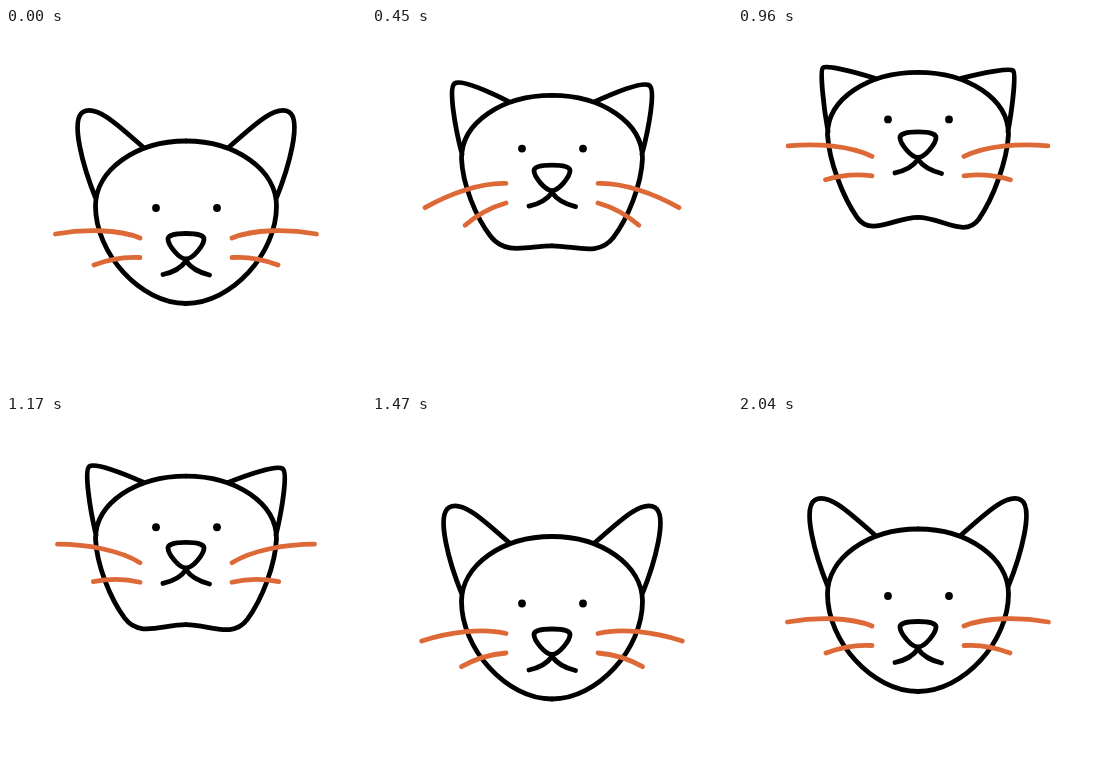
An HTML page for the animation above (2.34 s loop, 360 by 360 pixels).

```html
<!DOCTYPE html>
<html lang="en">
<head>
<meta charset="utf-8">
<title>Jumping cat</title>
<style>
html, body { margin: 0; height: 100%; overflow: hidden; background: #fff; }
svg { display: block; width: 100vw; height: 100vh; }
path { fill: none; stroke: #000; stroke-width: 4.8; stroke-linecap: round; stroke-linejoin: round; }
.whisker { stroke: #dd6937; }
</style>
</head>
<body>
<svg viewBox="0 0 360 360">
  <g id="body">
    <path id="left"/>
    <path id="right" transform="matrix(-1 0 0 1 360 0)"/>
    <circle cx="150" cy="180" r="3.9"/><circle cx="211" cy="180" r="3.9"/>
    <g id="muzzle">
      <path d="M180 205.5Q198 205.5 198 211C198 217 187 231 180 231S162 217 162 211Q162 205.5 180 205.5Z"/>
      <path d="M157 246.5Q173 243 180 233Q187 243 203.5 247"/>
    </g>
    <g id="whiskers">
      <g id="side">
        <path class="whisker" data-y="210" d="M134 210C112 201 78 201 49.5 206"/>
        <path class="whisker" data-y="229.5" d="M134 229.5Q111 228 88 237"/>
      </g>
      <use href="#side" transform="matrix(-1 0 0 1 360 0)"/>
    </g>
  </g>
</svg>
<script>
const LOOP = 2340, STEP = 30, LAST = 2040;
const $ = id => document.getElementById(id);
const whiskers = document.querySelectorAll(".whisker");

const span = (t, a, b) => Math.min(1, Math.max(0, (t - a) / (b - a)));
const ease = (t, a, b) => {
  const u = span(t, a, b);
  return u * u * (3 - 2 * u);
};

// Left half of head and ear; each point drifts by (dx, dy) as the cat lifts.
function half(lift, tilt) {
  const p = (x, y, dx, dy) => `${x + dx * lift} ${y + dy * lift} `;
  const crown = "M" + p(180, 113, 0, 20) + "C" + p(130, 113, 0, 20) + p(89.5, 142, 0, 17.5) + p(89.5, 178, 0, 17);
  const jaw = "C" + p(89.5, 201.5, 1.5, 20.5) + p(100.6, 226, 4.4, 32 + tilt) + p(117.5, 244.4, 1.5, 33.6 + tilt)
    + "S" + p(157, 275.5, -1, 2.5) + p(180, 275.5, 0, 2.5);
  const ear = "M" + p(90, 171, 0, 21) + "C" + p(77, 139, 8, 26) + p(64, 92, 18, 39 + 2 * tilt) + p(77, 84, 8, 44.5 + 2 * tilt)
    + "S" + p(112, 97, 0, 34 + tilt) + p(138, 120, -1, 19);
  return crown + jaw + ear;
}

const shift = (id, y) => $(id).setAttribute("transform", `translate(0 ${y})`);

function draw(t) {
  // Crouch, rise and fall like a thrown ball, then settle.
  const rise = 1 - (1 - span(t, 210, 748)) ** 2;
  const lift = rise - span(t, 925, 1460) ** 2;
  const crouch = ease(t, 0, 210) - ease(t, 1470, 1770);
  shift("body", 7.5 * crouch - 96.5 * lift);
  shift("muzzle", -13 * lift);
  shift("whiskers", 7 * lift);
  $("left").setAttribute("d", half(lift, 0));
  $("right").setAttribute("d", half(lift, 1.5));

  // Whiskers trail the jump: positive swing drops the outer tips.
  const swing = -3 * ease(t, 0, 195) + 23 * ease(t, 195, 380) - 30 * ease(t, 380, 1180)
    + 18 * ease(t, 1180, 1490) - 8 * ease(t, 1490, LAST);
  for (const w of whiskers) w.setAttribute("transform", `rotate(${-swing} 134 ${w.dataset.y})`);
}

const start = performance.now();
function tick() {
  const t = (performance.now() - start) % LOOP;
  draw(Math.min(LAST, Math.floor(t / STEP) * STEP));
  requestAnimationFrame(tick);
}
tick();
</script>
</body>
</html>
```
